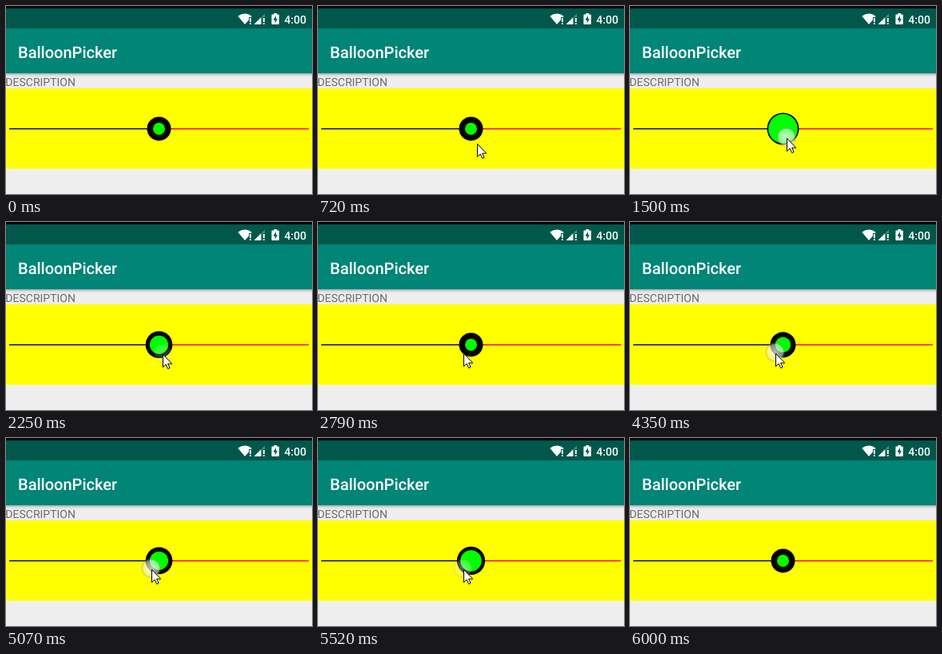
An HTML page for the animation above (6.45 s loop, 383x235 px).

```html
<!DOCTYPE html>
<html lang="en">
<head>
<meta charset="utf-8">
<title>Balloon picker</title>
<style>
  html, body { margin: 0; width: 100%; height: 100%; overflow: hidden; background: #eee; }
  svg { display: block; width: 383px; height: 235px; }
  text { font-family: Roboto, "Open Sans", sans-serif; text-rendering: geometricPrecision; }
</style>
</head>
<body>
<svg viewBox="0 0 383 235">
  <defs>
    <linearGradient id="shade" x1="0" y1="0" x2="0" y2="1">
      <stop offset="0" stop-color="#000" stop-opacity=".32"/>
      <stop offset=".45" stop-color="#000" stop-opacity=".1"/>
      <stop offset="1" stop-color="#000" stop-opacity="0"/>
    </linearGradient>
    <radialGradient id="glow">
      <stop offset="0" stop-color="#fff" stop-opacity=".75"/>
      <stop offset=".72" stop-color="#eee" stop-opacity=".58"/>
      <stop offset=".84" stop-color="#999" stop-opacity=".3"/>
      <stop offset="1" stop-color="#999" stop-opacity="0"/>
    </radialGradient>
  </defs>

  <rect width="383" height="235" fill="#eee"/>
  <rect width="383" height="3" fill="#000"/>
  <rect y="3" width="383" height="25" fill="#00574b"/>
  <rect y="28" width="383" height="56" fill="#008577"/>
  <rect y="84" width="383" height="5" fill="url(#shade)"/>

  <!-- status icons -->
  <g transform="translate(.5 .5)">
    <g fill="#fff">
      <path d="M289.8 12.2Q298.5 5.6 307.2 12.2L306.2 13.5H303.5V16.8L298.5 22.5Z"/>
      <path d="M304.4 14.5h1.8v5h-1.8zM304.4 20.7h1.8v1.8h-1.8z"/>
      <path d="M323.5 9V13.5H320V22.5H310Z" opacity=".3"/>
      <path d="M310 22.5L318.5 14V22.5Z"/>
      <path d="M321.4 14.5h1.8v5h-1.8zM321.4 20.7h1.8v1.8h-1.8z"/>
      <path d="M334.8 8.5h3.6v1.5h2.1q.8 0 .8.8v11q0 .8-.8.8h-7.8q-.8 0-.8-.8v-11q0-.8.8-.8h2.1z"/>
    </g>
    <path d="M337.4 11.5L333.9 17H336.1V21L339.4 15.5H337.4Z" fill="#00574b"/>
  </g>
  <text x="348.3" y="21.5" font-size="14" font-weight="500" fill="#fff">4:00</text>

  <text x="15" y="64.5" font-size="20" font-weight="500" fill="#fff">BalloonPicker</text>
  <text x="-.7" y="99.6" font-size="14" fill="#6c6c6c">DESCRIPTION</text>

  <rect y="103" width="383" height="100.5" fill="#ff0"/>
  <path d="M4 153.5H191" stroke="#00008c" stroke-width="1.4"/>
  <path d="M191 153.5H379" stroke="#f00" stroke-width="1.4"/>

  <circle id="rim" cx="191.5" cy="153.4" fill="#000"/>
  <circle id="core" cx="191.5" cy="153.4" fill="#0f0"/>
  <circle id="touch" r="13.5" fill="url(#glow)"/>
  <path id="cursor" d="M.5 .5V16.5L4.2 13L6.7 18.5L9 17.5L6.6 12.2H11.7Z" fill="#fff" stroke="#000"/>
</svg>
<script>
const LOOP = 6450, STEP = 30, GROW = 240, HOLD = 50, FADE = 130;
const ENTER = 240, LEAVE = 6000;
const $ = id => document.getElementById(id);
const rim = $("rim"), core = $("core"), touch = $("touch"), cursor = $("cursor");

const clamp = v => Math.min(1, Math.max(0, v));
const mix = (a, b, p) => a + (b - a) * p;
const linear = p => p;
const wave = p => (1 - Math.cos(Math.PI * p)) / 2;
const outCubic = p => 1 - (1 - p) ** 3;
const outBack = p => 1 + 2.7 * (p - 1) ** 3 + 1.7 * (p - 1) ** 2;

const presses = [
  { down: 1250, up: 2110 },
  { down: 3050, up: 3430 },
  { down: 4170, up: 4295 },
  { down: 4460, up: 4585 },
  { down: 4970, up: 5405 }
];

// each move carries the pointer on from where the last one ended
const origin = { x: 358, y: 69 };
const moves = [
  { from: ENTER, to: 900, x: 196, y: 165, easeX: outCubic, easeY: outBack },
  { from: 2370, to: 2430, x: 186, y: 171 },
  { from: 2580, to: 2790, x: 182, y: 164 },
  { from: 5820, to: 5970, x: 374, y: 121 }
];

function pointerAt(t) {
  let { x, y } = origin;
  for (const m of moves) {
    const p = clamp((t - m.from) / (m.to - m.from));
    x = mix(x, m.x, (m.easeX || linear)(p));
    y = mix(y, m.y, (m.easeY || linear)(p));
  }
  return { x: Math.round(x), y: Math.round(y) };
}

function pressAt(t) {
  const press = presses.filter(k => k.down <= t).pop();
  if (!press) return { size: 0, alpha: 0 };
  const { down, up } = press;
  // releasing runs the growth backwards from where it got to
  const grown = clamp((Math.min(t, up) - down) / GROW);
  return {
    size: wave(clamp(grown - Math.max(0, t - up) / GROW)),
    alpha: clamp(1 - (t - up - HOLD) / FADE)
  };
}

function draw(t) {
  const { x, y } = pointerAt(t);
  const { size, alpha } = pressAt(t);
  rim.setAttribute("r", mix(15, 20, size));
  core.setAttribute("r", mix(7.5, 18.3, size));
  touch.setAttribute("opacity", alpha);
  touch.setAttribute("transform", `translate(${x - .3} ${y - 1.2})`);
  cursor.setAttribute("transform", `translate(${x} ${y})`);
  cursor.setAttribute("visibility", t >= ENTER && t < LEAVE ? "visible" : "hidden");
}

const start = performance.now();
function tick() {
  const t = (performance.now() - start) % LOOP;
  draw(Math.floor(t / STEP) * STEP);
  requestAnimationFrame(tick);
}
tick();
</script>
</body>
</html>
```
